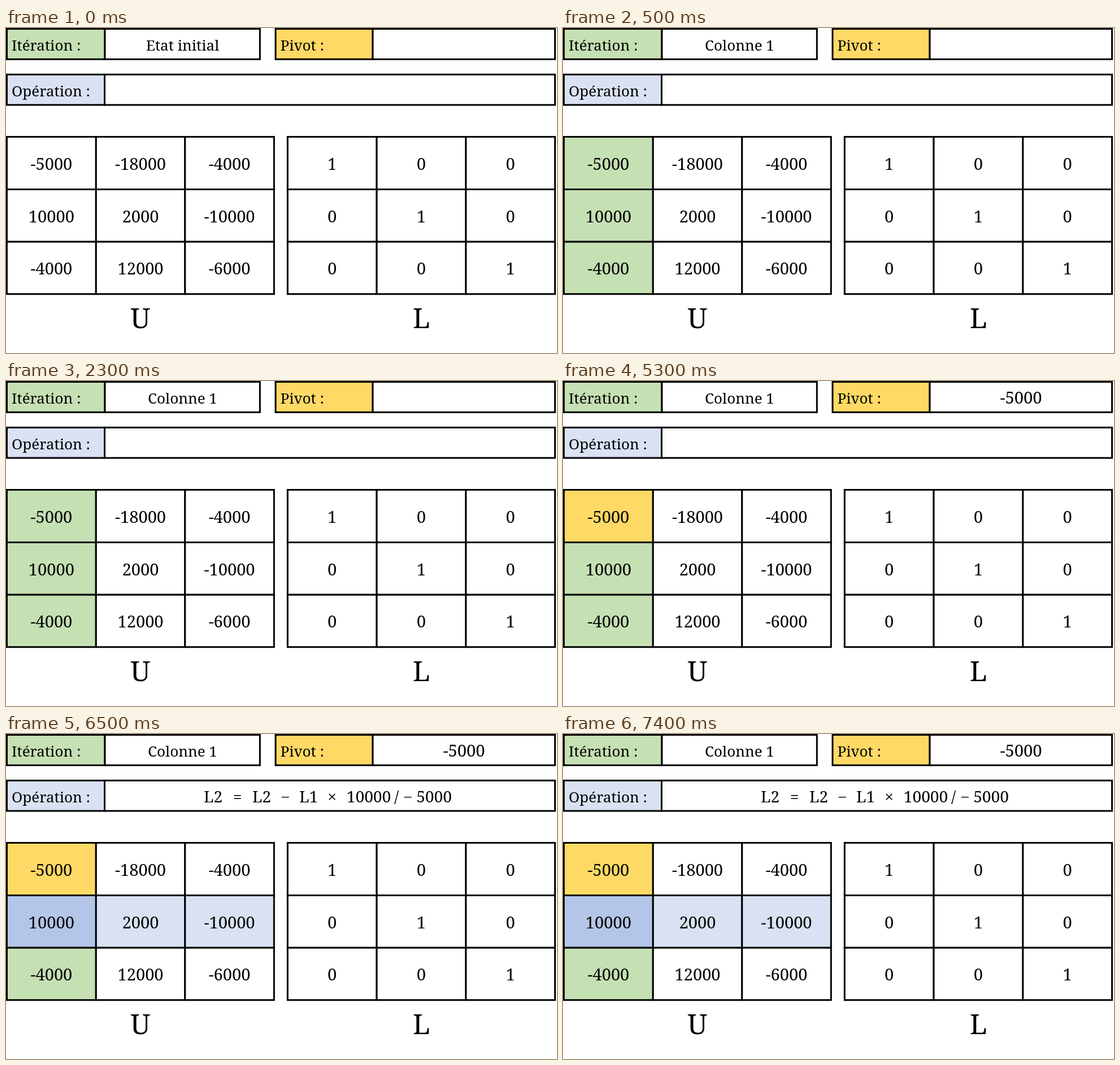
An HTML page with a canvas for the animation above (8 s loop, 975 by 575 pixels).

```html
<!DOCTYPE html>
<html lang="fr">
<head>
<meta charset="utf-8">
<style>
html, body { margin: 0; width: 100%; height: 100%; overflow: hidden; background: #fff; }
canvas { display: block; }
</style>
</head>
<body>
<canvas id="stage" width="975" height="575"></canvas>
<script>
const ctx = document.getElementById('stage').getContext('2d');
const LOOP = 8000;
const GREEN = '#c5e0b3', GOLD = '#ffd965', PALE = '#d9e2f3', BLUE = '#b4c6e7';
const TEXT = 26, DIGITS = 29, TITLE = 49;
const ROWS = [192.5, 285.5, 378.2, 470.7];
const U_COLS = [1.5, 159.3, 316.8, 474.3];
const L_COLS = [498.3, 656, 813.8, 971.5];
const U = [[-5000, -18000, -4000], [10000, 2000, -10000], [-4000, 12000, -6000]];
const L = [[1, 0, 0], [0, 1, 0], [0, 0, 1]];

// Tokens of the row operation, with the centre of each one
const OPERATION = [['L2', 366.5], ['=', 409.5], ['L2', 452.5], ['−', 494.5], ['L1', 535.5],
  ['×', 577], ['10000', 642], ['/', 691], ['−', 711.5], ['5000', 757.5]];

function label(text, x, y, size, align = 'center') {
  ctx.font = `${size}px "Noto Serif", serif`;
  ctx.textAlign = align;
  ctx.fillStyle = '#000';
  ctx.fillText(text, x, y);
}

function cell(x0, y0, x1, y1, fill) {
  ctx.fillStyle = fill || '#fff';
  ctx.fillRect(x0, y0, x1 - x0, y1 - y0);
  ctx.strokeRect(x0, y0, x1 - x0, y1 - y0);
}

function field(name, color, x0, split, x1, y) {
  cell(x0, y, split, y + 53.8, color);
  cell(split, y, x1, y + 53.8);
  label(name, x0 + 8.5, y + 38.5, TEXT, 'left');
}

function matrix(values, cols, name, fillAt) {
  values.forEach((row, r) => row.forEach((value, c) => {
    cell(cols[c], ROWS[r], cols[c + 1], ROWS[r + 1], fillAt(r, c));
    label(value, (cols[c] + cols[c + 1]) / 2, ROWS[r] + 58, DIGITS);
  }));
  label(name, (cols[0] + cols[3]) / 2, 531, TITLE);
}

function draw(time) {
  const column = time >= 500, pivot = time >= 3500, operation = time >= 6500;
  const fillU = (r, c) => {
    if (pivot && r === 0 && c === 0) return GOLD;
    if (operation && r === 1) return c ? PALE : BLUE;
    return column && c === 0 ? GREEN : null;
  };

  ctx.fillStyle = '#fff';
  ctx.fillRect(0, 0, 975, 575);
  ctx.strokeStyle = '#000';
  ctx.lineWidth = 3;

  field('Itération :', GREEN, 1.5, 175, 449.3, 1.5);
  field('Pivot :', GOLD, 477, 649, 971.5, 1.5);
  field('Opération :', PALE, 1.5, 174.5, 971.5, 82.3);

  label(column ? 'Colonne 1' : 'Etat initial', 312.5, 40, TEXT);
  if (pivot) label(-5000, 810.5, 40, DIGITS);
  if (operation) OPERATION.forEach(([token, x]) => label(token, x, 121, 28));

  matrix(U, U_COLS, 'U', fillU);
  matrix(L, L_COLS, 'L', () => null);
}

const start = performance.now();
function tick() {
  draw((performance.now() - start) % LOOP);
  requestAnimationFrame(tick);
}
tick();
</script>
</body>
</html>
```
